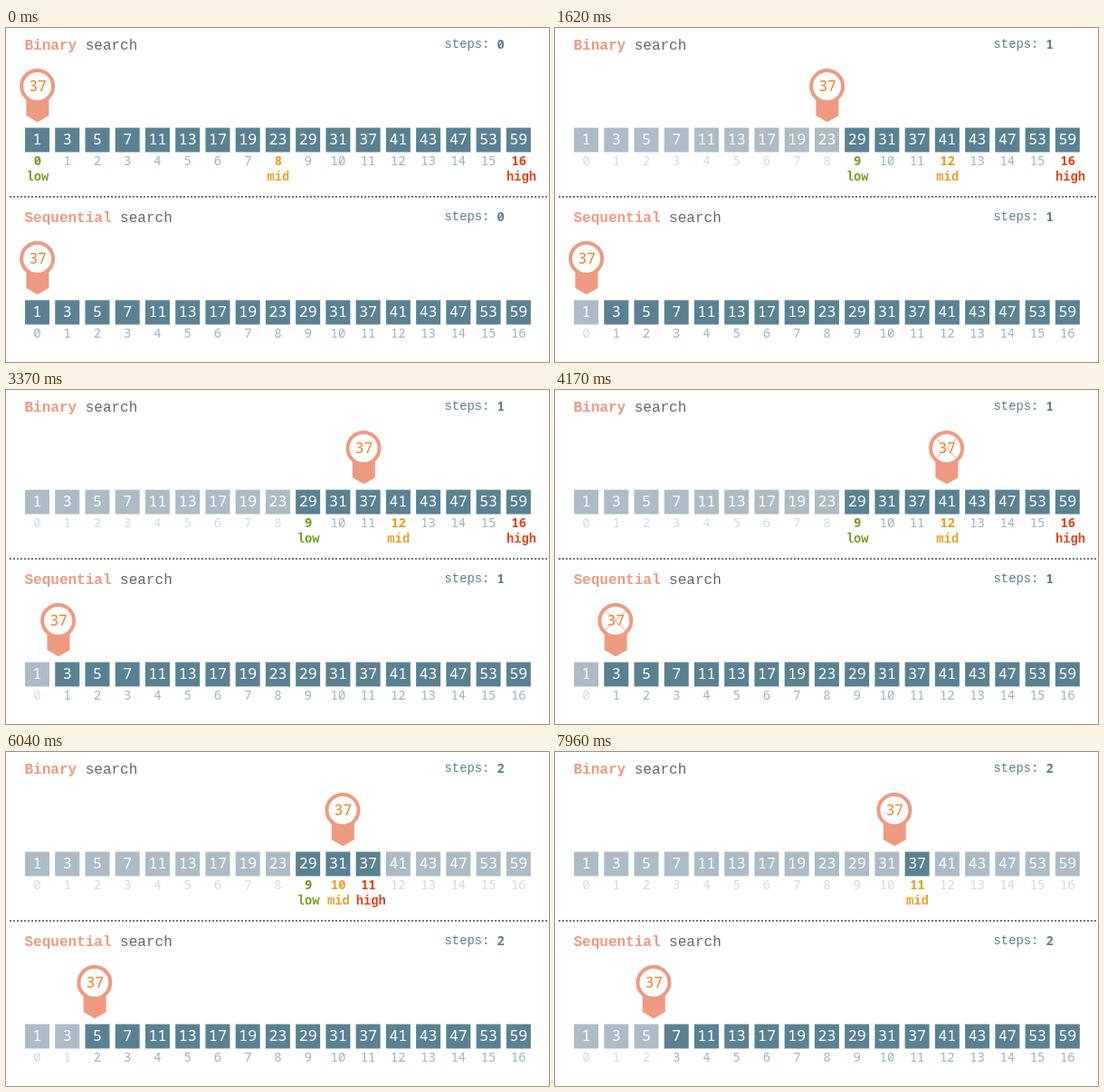
Animation of 600 by 370 pixels, one loop 8000 ms. Source, as an HTML page:

```html
<!DOCTYPE html>
<html lang="en">
<head>
<meta charset="utf-8">
<title>Binary and sequential search</title>
<style>
html, body { margin: 0; width: 100%; height: 100%; overflow: hidden; background: #fff; }
svg { display: block; width: 600px; height: 370px; }
text { font-family: "Noto Sans Mono", "DejaVu Sans Mono", monospace; font-size: 14px; }
.title, .steps, .role { font-family: "Liberation Mono", "DejaVu Sans Mono", monospace; }
.title { font-size: 16px; fill: #666; }
.title tspan { fill: #ee9a80; font-weight: 700; }
.steps { font-size: 13.8px; fill: #5a8090; }
.num { font: 600 13.8px "Noto Sans Mono", monospace; fill: #5a8090; }
.center { text-anchor: middle; }
.value { font-size: 16.5px; font-weight: 500; fill: #fff; }
.key { font-size: 16px; font-weight: 500; fill: #ee8022; }
.mark { font-size: 13.8px; font-weight: 700; }
.role { font-size: 13.8px; font-weight: 700; }
</style>
</head>
<body>
<svg id="stage" viewBox="0 0 600 370"></svg>
<script>
const LOOP = 8000, FRAME = 1000 / 24;
const VALUES = [1, 3, 5, 7, 11, 13, 17, 19, 23, 29, 31, 37, 41, 43, 47, 53, 59];
const COLORS = { low: '#719d1c', mid: '#ee9c24', high: '#df4414' };
const STATES = [
  { low: 0, mid: 8, high: 16 },
  { low: 9, mid: 12, high: 16 },
  { low: 9, mid: 10, high: 11 },
  { mid: 11 }
];
// Times in ticks of 1/24 s, pin positions in pixels
const MOVES = [
  { at: 0, len: 15, bin: [34.6, 300.6], seq: [34.6, 34.6] },
  { at: 74, len: 15, bin: [300.6, 432.6], seq: [34.6, 66.8] },
  { at: 135, len: 14, bin: [432.6, 366.6], seq: [66.8, 100.6] },
  { at: 189, len: 15, bin: [366.6, 400.2], seq: [100.6, 134] }
];
const MISSES = [{ at: 30, len: 9 }, { at: 100, len: 10 }, { at: 160, len: 10 }];

const stage = document.getElementById('stage');
const clamp = v => Math.max(0, Math.min(1, v));
const cellX = i => 34.5 + 33.24 * i;
const progress = (n, span) => clamp((n - span.at) / span.len);
const easeOut = p => 1 - (1 - p) * (1 - p);

function add(parent, tag, attrs, content) {
  const el = document.createElementNS('http://www.w3.org/2000/svg', tag);
  for (const k in attrs) el.setAttribute(k, attrs[k]);
  if (content !== undefined) el.textContent = content;
  parent.appendChild(el);
  return el;
}
const fade = (el, v) => el.setAttribute('opacity', v.toFixed(3));

function mix(a, b, p) {
  return 'rgb(' + a.map((v, i) => Math.round(v + (b[i] - v) * p)) + ')';
}

function buildPanel(name, dy) {
  const g = add(stage, 'g', { transform: `translate(0 ${dy})` });
  const title = add(g, 'text', { x: 20.5, y: 24, class: 'title' });
  add(title, 'tspan', {}, name);
  title.append(' search');
  add(g, 'text', { x: 484.6, y: 22, class: 'steps' }, 'steps:');
  const steps = [0, 1, 2].map(s => add(g, 'text', { x: 542.5, y: 22.5, class: 'num' }, s));

  const cells = VALUES.map((v, i) => {
    const x = cellX(i);
    const box = add(g, 'rect', { x: x - 13.5, y: 110.5, width: 27, height: 27 });
    add(g, 'text', { x, y: 129, class: 'value center' }, v);
    const index = add(g, 'text', { x, y: 152, class: 'center' }, i);
    return { box, index };
  });

  const pin = add(g, 'g', {});
  add(pin, 'path', { d: 'M-12.2 78H12.8V97L.3 104.2L-12.2 97Z', fill: '#ee9a80' });
  add(pin, 'circle', { cx: 0, cy: 64.5, r: 17.5, fill: '#fff', stroke: '#ee9a80', 'stroke-width': 4 });
  add(pin, 'text', { x: 0.4, y: 70, class: 'key center' }, 37);
  const cross = add(pin, 'path', { d: 'M-12 52.5L12 76.5M12 52.5L-12 76.5', stroke: '#f0a488' });
  return { g, steps, cells, pin, cross };
}

function buildRoles(g) {
  const marks = {};
  STATES.forEach((state, s) => {
    for (const role in state) {
      const i = state[role], id = role + i;
      if (!marks[id]) {
        const el = add(g, 'g', { fill: COLORS[role] });
        const x = cellX(i) + 0.4;
        add(el, 'text', { x, y: 152, class: 'mark center' }, i);
        add(el, 'text', { x: x + (role === 'high' ? 2.8 : 0), y: 169, class: 'role center' }, role);
        marks[id] = { el, i, states: [] };
      }
      marks[id].states.push(s);
    }
  });
  return Object.values(marks);
}

const bin = buildPanel('Binary', 0);
const seq = buildPanel('Sequential', 191);
const marks = buildRoles(bin.g);
add(stage, 'path', {
  d: 'M5 187H600', stroke: '#484848', 'stroke-width': 2,
  'stroke-linecap': 'round', 'stroke-dasharray': '0 4'
});

function paintPanel(panel, x, phase, missing, active, marked) {
  panel.pin.setAttribute('transform', `translate(${x.toFixed(2)} 0)`);
  fade(panel.cross, missing);
  panel.steps.forEach((el, s) => fade(el, clamp(1 - Math.abs(Math.min(phase, 2) - s))));
  panel.cells.forEach((cell, i) => {
    const a = active(i);
    cell.box.setAttribute('fill', mix([171, 188, 198], [90, 129, 146], a));
    cell.index.setAttribute('fill', mix([208, 219, 221], [154, 179, 194], a));
    fade(cell.index, 1 - marked(i));
  });
}

function draw(t) {
  const n = Math.floor((t + 5.1) / FRAME);
  const phase = MISSES.reduce((sum, m) => sum + progress(n, m), 0);
  const weight = s => clamp(1 - Math.abs(phase - s));
  const miss = MISSES.find(m => n >= m.at && n < m.at + m.len);
  const missing = miss ? 1 - progress(n, miss) : 0;

  const move = MOVES.filter(m => n >= m.at).pop();
  const p = easeOut(progress(n, move));
  const along = ([a, b]) => a + (b - a) * p;

  const inRange = (st, i) => i >= (st.low ?? st.mid) && i <= (st.high ?? st.mid);
  const shown = m => m.states.reduce((sum, s) => sum + weight(s), 0);
  marks.forEach(m => fade(m.el, shown(m)));

  paintPanel(bin, along(move.bin), phase, missing,
    i => STATES.reduce((sum, st, s) => sum + (inRange(st, i) ? weight(s) : 0), 0),
    i => clamp(marks.reduce((sum, m) => sum + (m.i === i ? shown(m) : 0), 0)));
  paintPanel(seq, along(move.seq), phase, missing, i => clamp(1 + i - phase), () => 0);
}

const start = performance.now();
function tick() {
  draw((performance.now() - start) % LOOP);
  requestAnimationFrame(tick);
}
draw(0);
requestAnimationFrame(tick);
</script>
</body>
</html>
```
